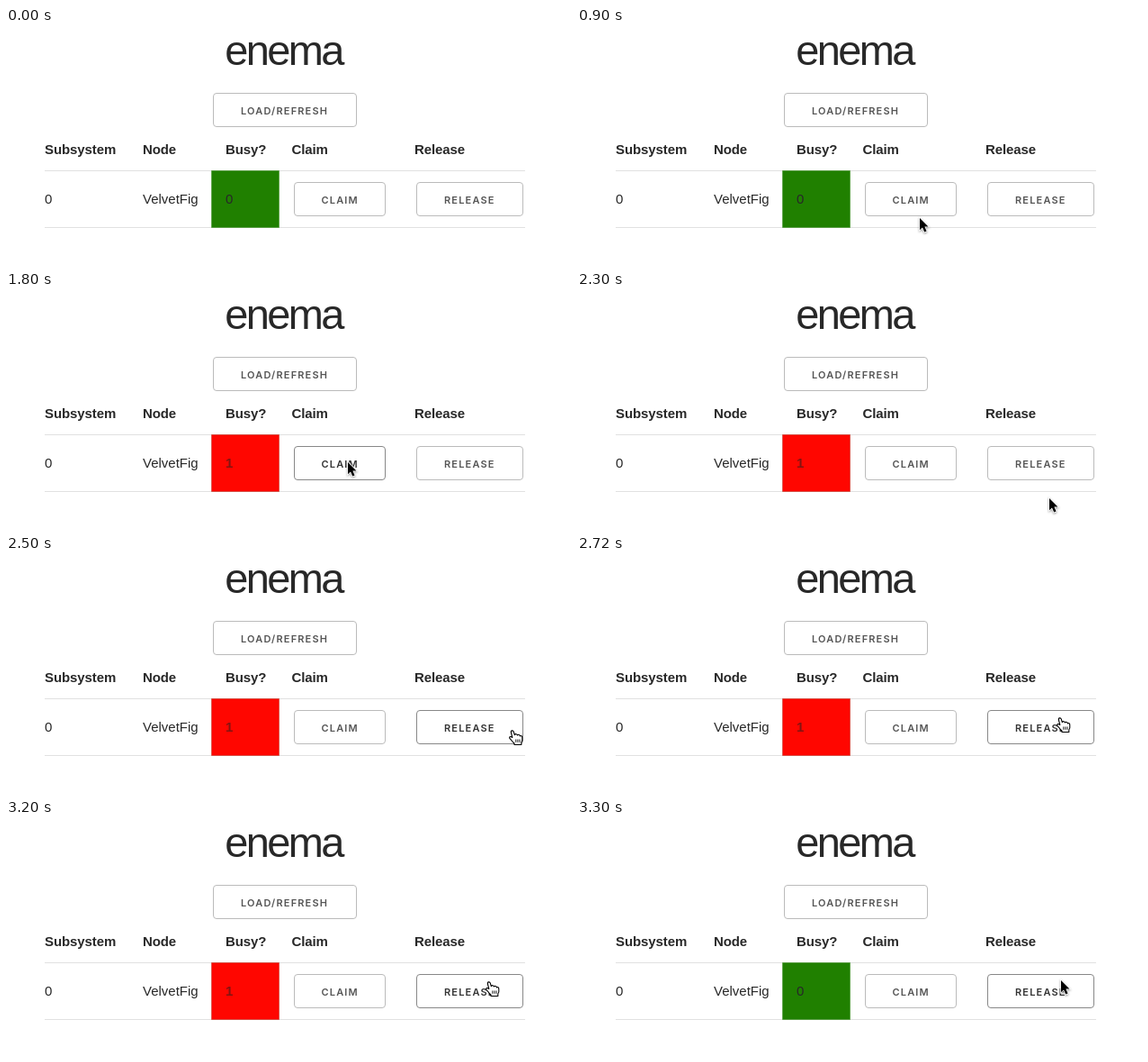
An HTML page that plays this animation: 628 by 262 pixels, repeating every 4.5 s.

```html
<!DOCTYPE html>
<html lang="en">
<head>
<meta charset="utf-8">
<title>enema</title>
<style>
html, body { margin: 0; width: 100%; height: 100%; overflow: hidden; background: #fff; }
svg { display: block; width: 628px; height: 262px; }
text { font: 15px "Liberation Sans", Arial, sans-serif; fill: #282828; }
.title { font-size: 47px; letter-spacing: -2.6px; }
.head text { font-weight: bold; letter-spacing: -.1px; }
.button text { font: 600 11px Inter, sans-serif; letter-spacing: 1.17px; fill: #555; }
.button rect { fill: none; stroke: #bbb; }
.hover text { fill: #333; }
.hover rect { stroke: #888; }
.line { stroke: #e1e1e1; }
#cell { fill: #208000; stroke: #208000; stroke-opacity: .4; }
.busy #cell { fill: #ff0600; stroke: #b01800; }
.busy #count { font-weight: bold; fill: #851410; }
#arrow { filter: drop-shadow(0 1px 1px #0006); }
</style>
</head>
<body>
<svg id="stage" viewBox="0 0 628 262">
  <text class="title" x="243.2" y="41">enema</text>
  <g class="head">
    <text x="43" y="140">Subsystem</text>
    <text x="152" y="140">Node</text>
    <text x="244" y="140">Busy?</text>
    <text x="317.5" y="140">Claim</text>
    <text x="454" y="140">Release</text>
  </g>
  <path class="line" d="M43 158.5H577M43 221.5H577"/>
  <rect id="cell" x="228.5" y="158.5" width="75" height="63"/>
  <text x="43" y="195">0</text>
  <text x="152" y="195">VelvetFig</text>
  <text id="count" x="244" y="195"></text>
  <g class="button">
    <rect x="230.5" y="72.5" width="159" height="37" rx="3.5"/>
    <text x="261" y="96">LOAD/REFRESH</text>
  </g>
  <g class="button" id="claim">
    <rect x="320.5" y="171.5" width="101" height="37" rx="3.5"/>
    <text x="350.5" y="195">CLAIM</text>
  </g>
  <g class="button" id="release">
    <rect x="456.5" y="171.5" width="118" height="37" rx="3.5"/>
    <text x="487" y="195">RELEASE</text>
  </g>
  <circle id="ring" cx="538.3" cy="179" r="29" fill="none" stroke="#000" stroke-width="3"/>
  <g id="pointer">
    <path id="arrow" d="M0 0V13.2L3 10.4L5.2 15.6L7.6 14.6L5.4 9.5H9.5Z" stroke="#fff" stroke-width="1.6" paint-order="stroke"/>
    <g id="hand" fill="#fff" stroke="#000" stroke-width="1.1" stroke-linejoin="round">
      <path d="M-1.2 8.5L-2.6 3Q-3 1.2-1.6.9T.3 2.2L1.3 5.6Q1.7 4.5 3 4.7T4.4 6Q5 5 6.2 5.4T7.4 7Q8.1 6.1 9 6.7T9.8 9Q10.2 12 8.8 14V16.5H1V15Q-1 13.5-2.4 11.3L-4.2 9.4Q-4.8 7.8-3.3 7.5Q-2.2 7.5-1.2 8.5Z"/>
      <path d="M2.8 10.5V13.8M4.9 10.5V13.8M7 10.5V13.8" stroke-width=".9"/>
    </g>
  </g>
</svg>
<script>
const $ = id => document.getElementById(id);
const show = (id, on) => $(id).style.display = on ? "" : "none";

// time, pointer shape, x, y, hovered button
const steps = [
  [0, "", 0, 0, ""],
  [900, "arrow", 381, 211, ""],
  [1000, "hand", 380, 194, "claim"],
  [1100, "hand", 380, 190, "claim"],
  [1800, "arrow", 380, 189, "claim"],
  [2300, "arrow", 525, 229, ""],
  [2400, "arrow", 587, 214, ""],
  [2500, "hand", 564, 193, "release"],
  [2600, "hand", 545, 184, "release"],
  [2720, "hand", 538, 179, "release"],
  [3300, "arrow", 538, 178, "release"]
];

function draw(t) {
  const [, shape, x, y, hover] = steps.findLast(s => s[0] <= t);
  const busy = t >= 1800 && t < 3300;
  for (const id of ["arrow", "hand"]) show(id, id === shape);
  for (const id of ["claim", "release"]) $(id).classList.toggle("hover", id === hover);
  $("pointer").setAttribute("transform", `translate(${x} ${y})`);
  show("ring", t >= 3100 && t < 3200);
  $("stage").classList.toggle("busy", busy);
  $("count").textContent = busy ? 1 : 0;
}

const start = performance.now();
function tick() {
  draw((performance.now() - start) % 4500);
  requestAnimationFrame(tick);
}
tick();
</script>
</body>
</html>
```
